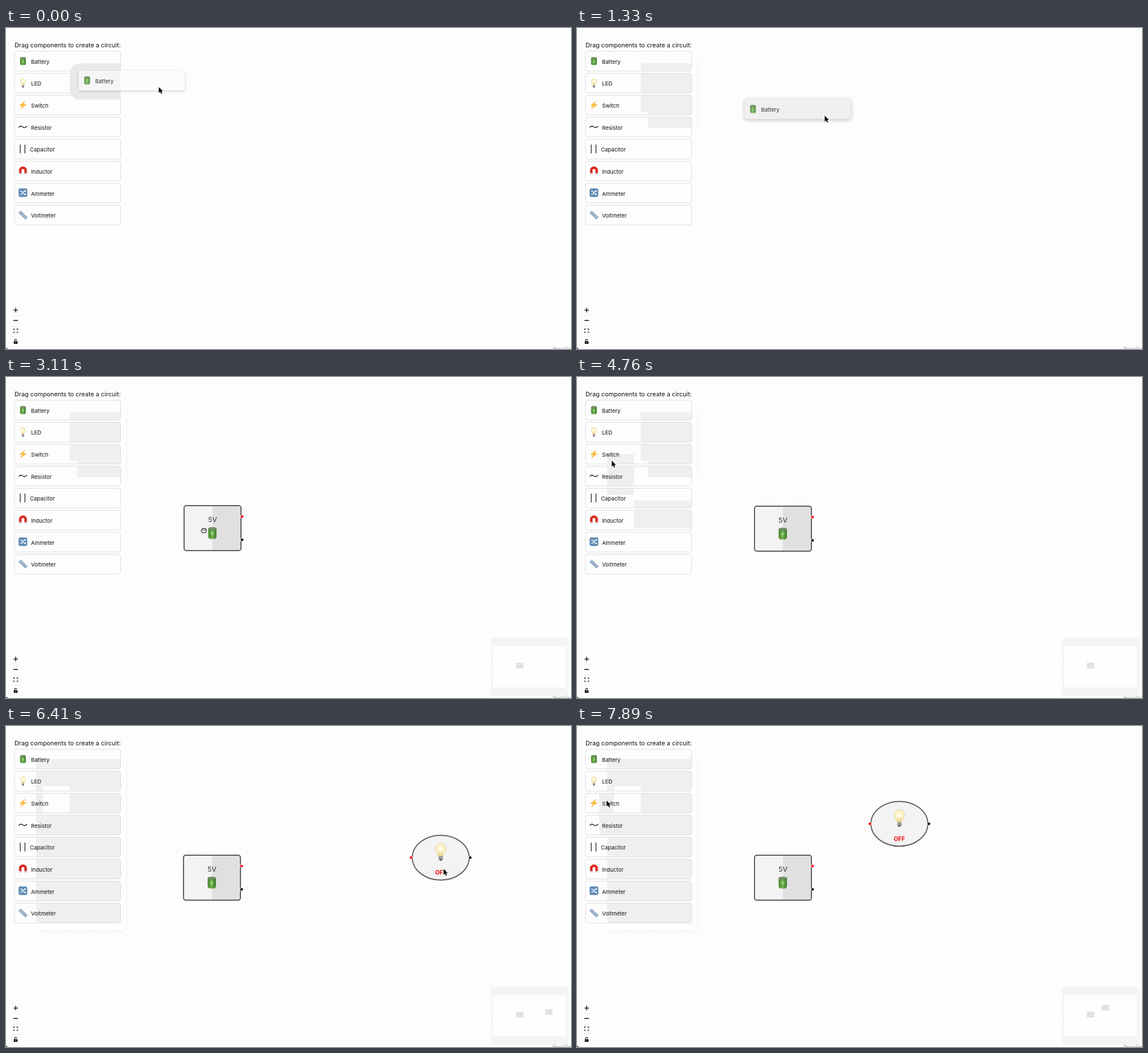
An HTML page with a canvas for the animation above (8 s loop, 993x564 px).

```html
<!DOCTYPE html>
<html lang="en">
<head>
<meta charset="utf-8">
<title>Circuit builder</title>
<style>
  html, body { margin: 0; width: 100%; height: 100%; overflow: hidden; background: #fdfdfd; }
  canvas { display: block; }
</style>
</head>
<body>
<canvas id="stage" width="993" height="564"></canvas>
<script>
const ctx = document.getElementById('stage').getContext('2d');
const LOOP = 8000, STEP = 148.8;
const PAPER = '#fdfdfd', SHADE = '#efefef', INK = '#111';
const LABELS = ['Battery', 'LED', 'Switch', 'Resistor', 'Capacitor', 'Inductor', 'Ammeter', 'Voltmeter'];
const CARD = { x: 15, y: 41, w: 186.5, h: 34.6, gap: 38.64 };

// The pointer eases from stop to stop: step, x, y.
const STOPS = [
  [0, 268.5, 103.7], [3, 285, 150], [9, 435.3, 154], [12, 435.3, 154],
  [16, 690.5, 349.5], [17, 690.5, 349.5], [21, 347.5, 269.5], [22, 346.5, 270.5],
  [26, 58, 136], [31, 57, 133], [32, 61, 147], [34, 56, 185], [38, 50, 91],
  [39, 100, 84], [43, 769, 251], [44, 769, 251], [48, 571.5, 191.5], [53, 52, 131]
];

// Parts follow the pointer while they are held and rest otherwise.
const PARTS = [
  { draw: batteryNode, born: 10, grab: 17, drop: 22, dx: 34.5, dy: 43.5 },
  { draw: ledNode, born: 43, grab: 44, drop: 48, dx: 55.5, dy: 59.5 }
];

const clamp = (v, lo, hi) => Math.min(hi, Math.max(lo, v));

function pointer(s) {
  const i = STOPS.findIndex(stop => stop[0] > s);
  if (i < 0) return STOPS[STOPS.length - 1].slice(1);
  const [a, ax, ay] = STOPS[i - 1], [b, bx, by] = STOPS[i];
  const f = Math.sin((s - a) / (b - a) * Math.PI / 2);
  return [ax + (bx - ax) * f, ay + (by - ay) * f];
}

function rect(x, y, w, h, fill) {
  ctx.fillStyle = fill;
  ctx.fillRect(x, y, w, h);
}

function paint(fill, stroke, lw = 1) {
  if (fill) { ctx.fillStyle = fill; ctx.fill(); }
  if (stroke) { ctx.strokeStyle = stroke; ctx.lineWidth = lw; ctx.stroke(); }
}

function round(x, y, w, h, r, fill, stroke, lw) {
  ctx.beginPath();
  ctx.roundRect(x, y, w, h, r);
  paint(fill, stroke, lw);
}

function oval(x, y, rx, ry, fill, stroke, lw) {
  ctx.beginPath();
  ctx.ellipse(x, y, rx, ry, 0, 0, Math.PI * 2);
  paint(fill, stroke, lw);
}

function shape(d, fill, stroke, lw = 1) {
  const p = new Path2D(d);
  if (fill) { ctx.fillStyle = fill; ctx.fill(p); }
  if (stroke) { ctx.strokeStyle = stroke; ctx.lineWidth = lw; ctx.stroke(p); }
}

function text(str, x, y, size, color = INK, weight = 400, align = 'left') {
  ctx.font = `${weight} ${size}px Inter, sans-serif`;
  ctx.textAlign = align;
  ctx.fillStyle = color;
  ctx.fillText(str, x, y);
}

function place(x, y, scale, draw) {
  ctx.save();
  ctx.translate(x, y);
  ctx.scale(scale, scale);
  draw();
  ctx.restore();
}

// Icons are centred on the origin.
const ICONS = [
  function battery() {
    const g = ctx.createLinearGradient(-5, 0, 5, 0);
    g.addColorStop(0, '#44822f');
    g.addColorStop(.45, '#74b552');
    g.addColorStop(1, '#3d7a2d');
    round(-5, -6.5, 10, 13.5, [2, 2, 3, 3], g);
    oval(0, -5.6, 4.8, 1.4, '#7d936f', '#4d7040', .5);
    shape('M.8-3L-2.2 1.2H-.2L-.8 4L2.2-.4H.2Z', '#a5d485');
  },
  function bulb() {
    const g = ctx.createRadialGradient(-.5, -3, .5, 0, -3, 6);
    g.addColorStop(0, '#fffdec');
    g.addColorStop(.6, '#fdf3c4');
    g.addColorStop(1, '#ecd69a');
    shape('M-2 4C-2 1.5-4.9-.2-4.9-3.2A4.9 4.9 0 0 1 4.9-3.2C4.9-.2 2 1.5 2 4Z', g, '#dccb9c', .35);
    shape('M-.9 3.6L-1.4-.6L0 .3L1.4-.6L.9 3.6', null, '#d8b76c', .35);
    round(-2, 3.8, 4, 3.4, .8, '#85888b');
    rect(-2, 4.9, 4, .5, '#c8cacc');
    oval(0, 7.3, 1.1, .7, '#56585b');
  },
  function bolt() {
    shape('M3.6-7.2L-6 .6L-.9 1.2L-4.6 7L6-1L.9-1.7Z', '#fbbd3a', '#f0a030', .4);
  },
  function wave() {
    ctx.lineCap = 'round';
    shape('M-7 .2C-5-2.4-2.8-2.2-.6-.5S4 1.6 7-1.4', null, '#222', 1.35);
  },
  function plates() {
    for (const x of [-5.4, 2.9]) rect(x, -8, 1.3, 15.5, '#222');
  },
  function magnet() {
    shape('M-4.5 5.5L-4.8-1.2A4.8 4.8 0 0 1 4.8-1.2L4.5 5.5', null, '#d92d22', 4.4);
    for (const x of [-6.7, 2.3]) rect(x, 3.4, 4.4, 2.6, '#d5d9dc');
  },
  function shuffle() {
    round(-7.2, -8, 14.4, 14.4, 2.4, '#5f8cb6', '#4675a2', .6);
    shape('M-5-3.6H-2.6L2 2H4M-5 2H-2.6L2-3.6H4', null, '#fff', 1.2);
    shape('M3-5.6L5.8-3.6L3-1.6ZM3 0L5.8 2L3 4Z', '#fff');
  },
  function ruler() {
    ctx.rotate(.76);
    rect(-8.5, -2.9, 17, 5.2, '#a6bbcf');
    rect(-8.5, 1.5, 17, .9, '#7790a9');
    for (let x = -7.5; x < 8; x += 1.7) rect(x, -2.9, .5, 2, '#64819d');
  }
];

function dots() {
  for (let x = 18; x < 985; x += 20.33) {
    for (let y = 18.7; y < 560; y += 20.33) {
      const panel = x < 213 && y < 361, tools = x < 28 && y > 485, map = x > 853 && y > 458;
      if (!panel && !tools && !map) rect(x - .5, y - .5, 1, 1, '#c6c6ca');
    }
  }
}

// Grey left on the cards by earlier moves, each patch running to the panel edge by default.
function tints(s) {
  const tint = (x, y, bottom, right = 202, fill = SHADE) => rect(x, y, right - x, bottom - y, fill);
  if (s >= 40) {
    tint(53, 58, 348);
    tint(65, 106, 154, 112, PAPER);
    if (s >= 52) tint(39, 118, 192, 53);
    return;
  }
  if (s >= 1) tint(112, 62, 147);
  if (s >= 3) tint(125, 147, 176);
  if (s >= 24) tint(100, 217, 266);
  if (s >= 26) tint(53, 135, 207, 100);
}

function cardFace(i, x, y) {
  place(x + 14.8, y + 17.3, 1, ICONS[i]);
  text(LABELS[i], x + (i === 4 ? 27 : 29), y + 21.7, 9.55);
}

function panel(s) {
  const top = i => CARD.y + i * CARD.gap;
  text('Drag components to create a circuit:', 15, 33.6, 10.85);
  if (s >= 3) rect(211.5, 60, 1, s < 40 ? 116 : 298, '#eeeeee');
  if (s >= 40) rect(56, 360, 151, 1, '#eeeeee');
  ctx.save();
  ctx.beginPath();
  LABELS.forEach((_, i) => ctx.roundRect(CARD.x, top(i), CARD.w, CARD.h, 4));
  ctx.clip();
  tints(s);
  ctx.restore();
  LABELS.forEach((_, i) => {
    round(CARD.x, top(i), CARD.w, CARD.h, 4, null, '#dcdcde');
    cardFace(i, CARD.x, top(i));
  });
}

// The dragged card; at first it still overlaps the panel.
function ghost(i, x, y, first) {
  if (first) round(112, 62, 89.5, 64, [18, 0, 0, 18], '#e9e9e9');
  else round(x - 4, y - 4.5, CARD.w + 10, CARD.h + 11, 9, '#f5f5f5');
  ctx.save();
  ctx.shadowColor = 'rgba(0,0,0,.18)';
  ctx.shadowBlur = 5;
  ctx.shadowOffsetY = 1.5;
  round(x, y, CARD.w, CARD.h, 4, first ? '#fcfcfc' : '#f0f0f0');
  ctx.restore();
  if (first) rect(x, y, 201 - x, CARD.h, '#f5f5f5');
  ctx.globalAlpha = .85;
  cardFace(i, x, y);
  ctx.globalAlpha = 1;
}

function pin(x, y, color) {
  oval(x, y, 2.8, 2.8, color, '#fff', .9);
}

function batteryNode(x, y) {
  const w = 100, h = 79;
  round(x, y, w, h, 4, '#f3f3f3');
  rect(x + w / 2, y, w / 2 - 1, h, '#e0e0e0');
  round(x, y, w, h, 4, null, '#5e5e60', 2);
  text('5V', x + w / 2, y + 28.7, 12.2, '#333', 400, 'center');
  place(x + w / 2 - .3, y + 48.4, 1.45, ICONS[0]);
  pin(x + 102, y + 19.2, 'red');
  pin(x + 102, y + 60, '#000');
}

function ledNode(x, y) {
  const cx = x + 50.6, cy = y + 39.8;
  oval(cx, cy, 50, 39.4, '#f3f3f3', '#646466', 2);
  place(cx, cy - 9.5, 1.88, ICONS[1]);
  text('OFF', cx, cy + 29.7, 10.1, '#f00a0a', 700, 'center');
  pin(cx - 51.8, cy, 'red');
  pin(cx + 51.8, cy, '#000');
}

function miniMap(spots) {
  rect(853, 458.5, 135, 101.5, '#f4f4f4');
  rect(856.3, 473, 128, 72.5, '#fefefe');
  for (const [x, y] of spots) rect(856.3 + x * .128, 473 + y * .128, 13, 10.2, '#e2e2e2');
}

function tools() {
  for (let i = 0; i < 3; i++) rect(8, 504.5 + i * 18.35, 18, .8, '#eeeeee');
  ctx.lineCap = 'butt';
  shape('M13 495.6H21M17 491.6V499.6M13 513.7H21', null, INK, 1.4);
  shape('M13.4 530.6V528.9H15.5M18.5 528.9H20.6V530.6M20.6 533.3V535H18.5M15.5 535H13.4V533.3', null, INK, 1.1);
  round(13.7, 550.2, 6.6, 4.8, 1, INK);
  shape('M15.1 550.5V548.9A1.8 1.8 0 0 1 18.7 548.9', null, INK, 1.1);
  rect(16.5, 551.8, 1, 1.5, '#fff');
  shape('M0 561.5Q.8 563.4 4 564H0Z', INK);
  text('React Flow', 961, 566, 7, '#999');
}

function arrow() {
  const d = 'M0 0V10.4L2.4 8.2L4.1 12L5.9 11.2L4.3 7.5H7.5Z';
  ctx.lineJoin = 'round';
  shape(d, null, '#fff', 1.6);
  shape(d, '#000');
}

function fist() {
  ctx.lineJoin = ctx.lineCap = 'round';
  shape('M-2.6 4.2L-4.2 1.2Q-5-.8-3-.8V-2.4Q-2.6-3.8-1.2-3Q0-4.4 1-3Q2.4-3.8 3-2.6Q4.6-2.8 4.6-.8Q4.6 1.6 3.2 4.2Z', '#fff', INK, 1.1);
  shape('M-1.2-1.4V.2M.9-1.4V.2M2.9-1.4V.2', null, INK, .8);
}

function draw(t) {
  const s = Math.floor(t / STEP + .15);
  const [px, py] = pointer(s);
  rect(0, 0, 993, 564, PAPER);
  dots();
  panel(s);
  tools();
  const live = PARTS.filter(p => s >= p.born);
  const spots = live.map(p => {
    const [x, y] = pointer(clamp(s, p.grab, p.drop));
    return [x - p.dx, y - p.dy];
  });
  live.forEach((p, i) => p.draw(...spots[i]));
  if (live.length) miniMap(spots);
  if (s < 10) ghost(0, px - 140.8, py - 28.7, s === 0);
  if (s >= 39 && s < 43) ghost(1, px - 36, py - 12, false);
  const held = live.some(p => s >= p.grab && s < p.drop);
  place(px, py, 1, held ? fist : arrow);
}

const start = performance.now();
function tick() {
  draw((performance.now() - start) % LOOP);
  requestAnimationFrame(tick);
}
tick();
</script>
</body>
</html>
```
